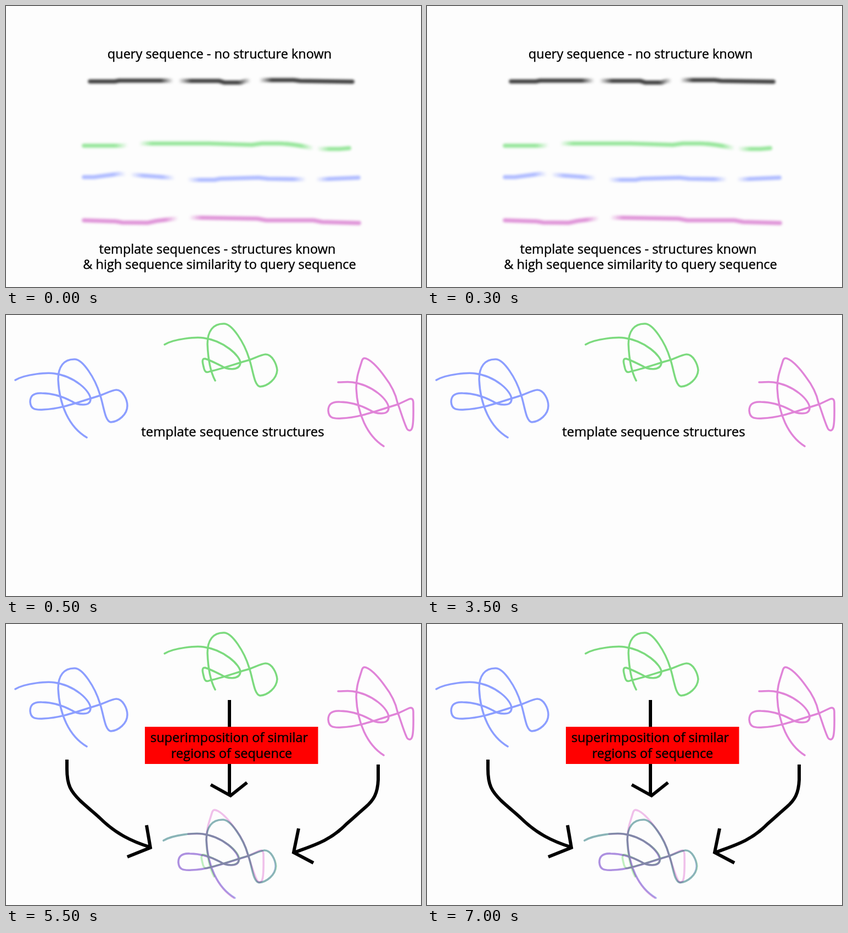
An HTML page that plays this animation: 756x514 px, repeating every 8 s.

```html
<!DOCTYPE html>
<html lang="en">
<head>
<meta charset="utf-8">
<title>Template superimposition</title>
<style>
  html, body { margin: 0; width: 100%; height: 100%; overflow: hidden; background: #fdfdfd; }
  svg { display: block; width: 756px; height: 514px; }
  path, use { fill: none; stroke-linecap: round; stroke-linejoin: round; }
  text { font: 23.5px "Open Sans", sans-serif; text-anchor: middle; stroke: #000; stroke-width: .4; }
  #rows { filter: blur(2.1px); }
  #rows path { stroke-width: 7.6; }
  #templates { stroke-width: 3.5; filter: blur(.6px); }
  #overlay { stroke-width: 3.6; isolation: isolate; filter: blur(.6px); }
  #overlay use { mix-blend-mode: multiply; }
  #arrows path { stroke: #000; stroke-width: 6; stroke-linecap: butt; stroke-linejoin: miter; }

  .scene { animation: 8s step-end infinite; }
  #sequences { animation-name: sequences; }
  #templates { animation-name: templates; }
  #caption { animation-name: caption; font-size: 24px; }
  #merge { animation-name: merge; }
  @keyframes sequences { 0% { visibility: visible } 6.25%, 100% { visibility: hidden } }
  @keyframes templates { 0% { visibility: hidden } 6.25%, 100% { visibility: visible } }
  @keyframes caption { 0% { visibility: hidden } 6.25% { visibility: visible } 68.75%, 100% { visibility: hidden } }
  @keyframes merge { 0% { visibility: hidden } 68.75%, 100% { visibility: visible } }
</style>
</head>
<body>
<svg viewBox="0 0 756 514">
  <defs>
    <!-- the three folds share one coordinate frame -->
    <path id="foldA" d="M17 119C35 108 75 105 88 107C125 112 155 140 154 155C153 168 130 165 120 158C105 150 85 143 65 143C48 142 44 150 44 159C45 172 52 174 68 173C100 172 130 160 172 147C185 142 195 137 201 137C213 137 221 155 221 166C221 182 205 195 191 196C180 195 178 165 171 145C162 115 140 82 126 81C105 80 95 95 95 118C97 165 115 205 147 224"/>
    <path id="foldB" d="M17 119C35 108 75 105 88 107C125 112 155 140 155 153C153 168 130 165 120 158C110 153 98 147 91 145C84 144 86 152 88 160C90 170 93 171 100 168C120 164 150 153 172 147C185 142 195 137 201 137C213 137 221 155 222 166C221 182 205 195 191 196C180 195 178 165 171 145C162 115 140 82 126 81C105 80 95 95 95 118C96 145 100 168 109 185"/>
    <path id="foldC" d="M62 107C72 107 80 106 88 107C125 112 155 140 154 155C153 168 130 165 120 158C105 150 85 143 65 143C48 142 44 150 44 159C45 172 52 174 68 173C100 172 130 160 172 147L191 138C196 136 199 138 199 145C199 160 200 180 197 190C195 197 189 197 186 189C180 175 176 160 170 144C166 125 157 110 147 97C137 83 127 71 116 65C110 62 107 62 105 69C100 86 95 97 95 118C97 165 115 205 145 224"/>
  </defs>

  <g id="sequences" class="scene">
    <g id="rows"></g>
    <text x="389" y="96">query sequence - no structure known</text>
    <text x="385" y="453">template sequences - structures known</text>
    <text x="389" y="481">&amp; high sequence similarity to query sequence</text>
  </g>

  <g id="templates" class="scene">
    <use href="#foldA" stroke="#8c9eff"/>
    <use href="#foldB" x="272" y="-65" stroke="#7cda7e"/>
    <use href="#foldC" x="543" y="16" stroke="#e084d8"/>
  </g>

  <text id="caption" class="scene" x="413" y="222">template sequence structures</text>

  <g id="merge" class="scene">
    <g id="overlay" transform="translate(270 277)">
      <use href="#foldA" stroke="#b8c0f4"/>
      <use href="#foldB" stroke="#c0f0c0"/>
      <use href="#foldC" stroke="#f0c0ea"/>
    </g>
    <g id="arrows">
      <path d="M407 139V312M373 294L409 314L439 290"/>
      <path d="M111 248V265C111 295 118 306 135 323C150 337 158 343 170 354C200 384 230 398 262 408M256 368L263 409L221 426"/>
      <path d="M678 257V285C677 310 670 322 655 335C640 348 635 353 620 366C590 397 560 405 525 418M533 374L524 418L560 437"/>
    </g>
    <rect x="253" y="188" width="315.5" height="68" fill="#f00"/>
    <text x="406.5" y="216">superimposition of similar</text>
    <text x="411" y="245">regions of sequence</text>
  </g>
</svg>
<script>
  // Each gap is [start, end]; the stroke fades out before it and back in after it.
  const rows = [
    { color: "#404040", gaps: [[305, 314], [446, 461]],
      d: "M153 138H198L206 136.5H292L330 137H388L398 140H427L437 137L472 135.5H524L536 137L631 138.5" },
    { color: "#98e69c", gaps: [[222, 242], [561, 566]],
      d: "M142 255.5H212L250 251.5H370L386 252L448 254L466 251.5H498Q520 252 555 259L574 261.5H608L625 260" },
    { color: "#b0bcff", gaps: [[219, 226], [308, 330], [547, 564]],
      d: "M142 313H160L206 307L234 309L300 314L340 318H380L390 316L460 314L478 316L540 317H574L642 314" },
    { color: "#df94d8", gaps: [[314, 333]],
      d: "M142 392L200 394L212 396L258 396.5L275 393L308 389L342 387L458 389L474 392H560L576 395L643 397" }
  ];
  const fade = 23;
  const stop = (x, color, alpha) =>
    `<stop offset="${x / 756}" stop-color="${color}" stop-opacity="${alpha}"/>`;

  document.getElementById("rows").innerHTML = rows.map(({ color, gaps, d }, i) => {
    const stops = gaps.map(([a, b]) =>
      stop(a - fade, color, 1) + stop(a, color, 0) + stop(b, color, 0) + stop(b + fade, color, 1)).join("");
    return `<linearGradient id="row${i}" gradientUnits="userSpaceOnUse" x1="0" x2="756" y1="0" y2="0">${stops}</linearGradient>
      <path d="${d}" stroke="url(#row${i})"/>`;
  }).join("");
</script>
</body>
</html>
```
